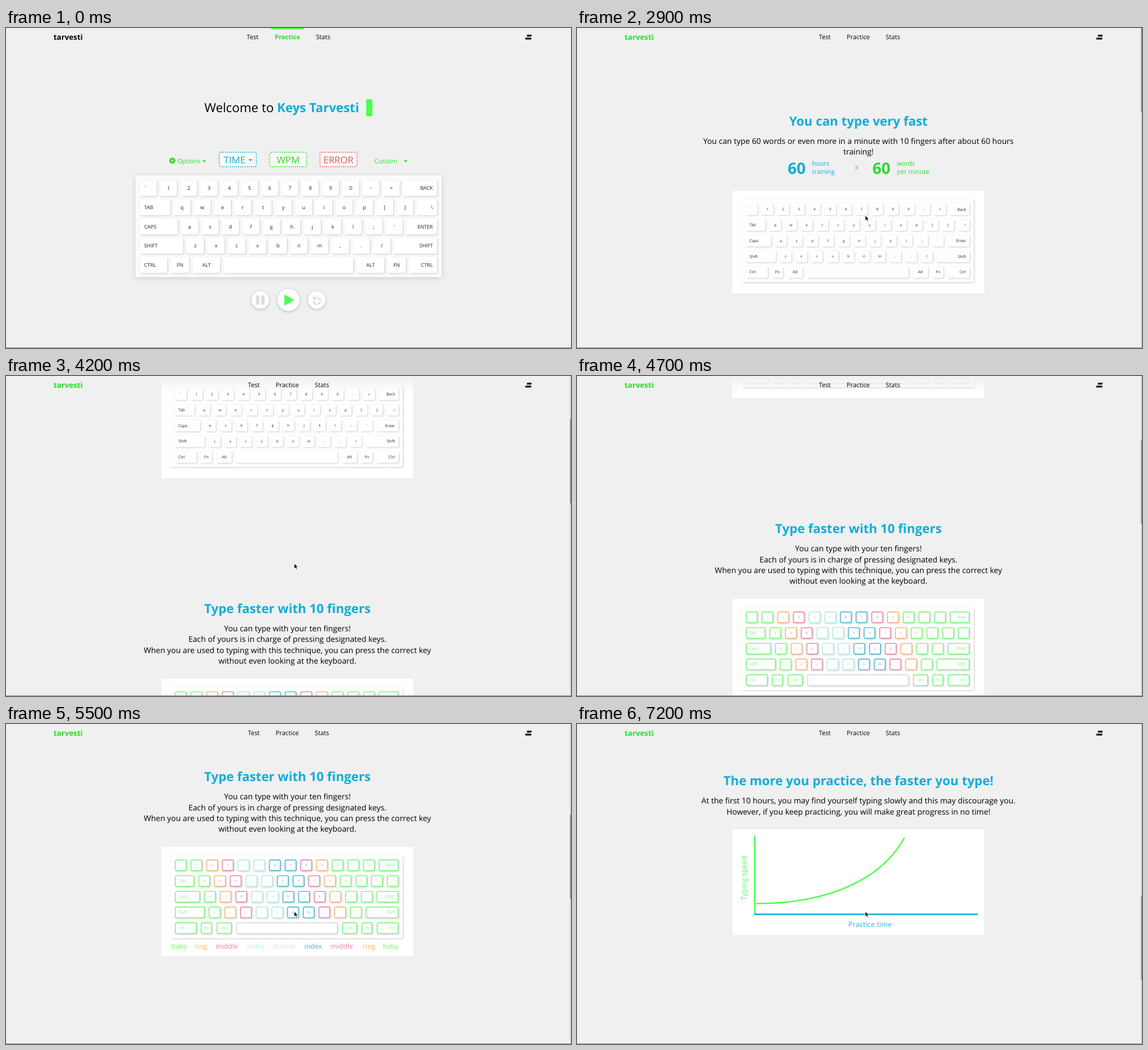
These frames come from a looping animation (960 by 544 pixels, 8 s). An HTML page:

```html
<!DOCTYPE html>
<html lang="en">
<head>
<meta charset="utf-8">
<title>Typing practice</title>
<style>
html, body { margin: 0; width: 100%; height: 100%; overflow: hidden; background: #f0f0f0; }
svg { display: block; width: 960px; height: 544px; font-family: "Open Sans", "Noto Sans", sans-serif; text-rendering: geometricPrecision; }
.panel { filter: drop-shadow(0 2px 4px #0002); }
.keys { filter: drop-shadow(1px 1.5px 1.5px #0003); }
.round { filter: drop-shadow(0 1.5px 2px #0004); }
</style>
</head>
<body>
<svg id="stage" viewBox="0 0 960 544"></svg>
<script>
const GREEN = "#2bdb2b", LIME = "#4dff4d", BLUE = "#0fadd8", RED = "#e25c5c";
const FINGER = { g: "#72fb72", o: "#f5b470", p: "#e680a4", c: "#b4eee9", b: "#3fb5d8", t: "#dedede" };
const TITLE = 21.42, BODY = 13.39, SMALL = 10.7;

const text = (x, y, str, size, fill = "#000", anchor = "start", more = "") =>
  `<text x="${x}" y="${y}" font-size="${size}" fill="${fill}" text-anchor="${anchor}" ${more}>${str}</text>`;
const bold = (x, y, str, size, fill, anchor) => text(x, y, str, size, fill, anchor, 'font-weight="700"');
const rect = (x, y, w, h, fill, more = "") =>
  `<rect x="${x}" y="${y}" width="${w}" height="${h}" fill="${fill}" ${more}/>`;
const path = (d, fill, more = "") => `<path d="${d}" fill="${fill}" ${more}/>`;
const caret = (x, y) => `M${x} ${y}h6.6l-3.3 3.6z`;

const ROWS = [
  ["`", "1234567890-=", "Back"],
  ["Tab", "qwertyuiop[]", "\\"],
  ["Caps", "asdfghjkl;'", "Enter"],
  ["Shift", "zxcvbnm,./", "Shift"]
];
const BOTTOM = ["Ctrl", "Fn", "Alt", "", "Alt", "Fn", "Ctrl"];

// Each row: a wide first key, equal letter keys from starts[i], a last key up to the right edge
const HOME_KEYS = {
  x0: 227.5, x1: 732.5, y: 258.5, dy: 32.75, h: 27, gap: 5.8, size: 8.67, letter: 8.67, pad: 7.3, caps: true,
  starts: [[261.9, 34.4], [284.7, 34.45], [297.5, 34.75], [307, 35.2]],
  bottom: [227.5, 274, 280, 311.5, 317.5, 364, 370, 590, 596, 642.5, 648, 679.5, 685, 732.5]
};
const CARD_KEYS = {
  x0: 287, x1: 667, y: 298.5, dy: 26.7, h: 19.5, gap: 6.7, size: 6.7, letter: 6, pad: 6, caps: false,
  starts: [[313.65, 26.65], [326.8, 26.7], [336.5, 26.65], [344.5, 26.65]],
  bottom: [287, 324, 331, 350, 358, 383.5, 391, 563.5, 571, 596.5, 604, 622.5, 630, 667]
};

function keyboard(k, colored) {
  let boxes = "", labels = "";
  const inset = colored ? .7 : 0;
  const key = (a, b, row, label, side, finger) => {
    const y = k.y + row * k.dy, color = FINGER[finger];
    boxes += rect(a + inset, y + inset, b - a - 2 * inset, k.h - 2 * inset, "#fff",
      `rx="2" ` + (colored ? `stroke="${color}" stroke-width="1.4"` : ""));
    const x = side == "start" ? a + k.pad : side == "end" ? b - k.pad : (a + b) / 2;
    const size = label.length > 1 ? k.size : k.letter;
    labels += text(x, y + k.h / 2 + size * .35 - inset, k.caps && label.length > 1 ? label.toUpperCase() : label,
      size, colored ? color : "#222", side);
  };
  ROWS.forEach(([first, mid, last], row) => {
    const [start, pitch] = k.starts[row];
    key(k.x0, start - k.gap, row, first, "start", "g");
    [...mid].forEach((c, i) => {
      const x = start + i * pitch;
      key(x, x + pitch - k.gap, row, c, "middle", "gopccbbpo"[i] || "g");
    });
    key(start + mid.length * pitch, k.x1, row, last, "end", "g");
  });
  BOTTOM.forEach((label, i) => key(k.bottom[2 * i], k.bottom[2 * i + 1], 4, label,
    i == 0 ? "start" : i == 6 ? "end" : "middle", label ? "g" : "t"));
  return `<g class="keys">${boxes}</g>${labels}`;
}

const dotted = (x, label, lx, color) =>
  rect(x, 211.3, 63, 24.4, "#f9f9f9", `rx="2.5" stroke="${color}" stroke-width="1.5" stroke-dasharray="1.8 1.8"`) +
  text(lx, 229.6, label, 16, color);

function gear(x, y) {
  let teeth = "";
  for (let i = 0; i < 8; i++) teeth += rect(x - 1.2, y - 5.5, 2.4, 3, GREEN, `transform="rotate(${i * 45} ${x} ${y})"`);
  return teeth + `<circle cx="${x}" cy="${y}" r="2.9" fill="none" stroke="${GREEN}" stroke-width="2.4"/>`;
}
const disc = (x, r) => `<circle class="round" cx="${x}" cy="462.5" r="${r}" fill="#fff"/>`;

const home = text(337, 143.3, "Welcome to", TITLE) +
  bold(460.5, 143.3, "Keys Tarvesti", TITLE, BLUE) +
  rect(612, 121, 10.5, 29, LIME, 'id="bar" rx="1.5"') +
  gear(282.6, 225.5) + text(291, 229.7, "Options", SMALL, GREEN) + text(626, 229.7, "Custom", SMALL, GREEN) +
  path(caret(333.7, 225) + caret(675.8, 225), GREEN) +
  dotted(362.3, "TIME", 370, BLUE) + path(caret(412, 223), BLUE) +
  dotted(448, "WPM", 460, GREEN) + dotted(533.5, "ERROR", 539.3, RED) +
  rect(220, 250.5, 520, 173, "#fbfbfb", 'rx="3" class="panel"') + keyboard(HOME_KEYS) +
  disc(432, 15) + rect(424.8, 454.5, 5.6, 16, "#ddd") + rect(433.8, 454.5, 5.6, 16, "#ddd") +
  disc(480, 19) + path("M473 453V472L490 462.5z", LIME) +
  disc(528, 15) + path("M524.5 459.5a5.8 5.8 0 1 1 -2 4.8", "none", 'stroke="#d6d6d6" stroke-width="1.8"') +
  path("M521.8 455.5v6h6z", "#d6d6d6");

const heading = (y, str) => bold(478.2, y, str, TITLE, BLUE, "middle");
const lines = (y, list) => list.map((s, i) => text(478.2, y + i * 18.4, s, BODY, "#000", "middle")).join("");
const card = (y, h) => rect(264, y, 428, h, "#fff");
const cardBoard = (y, colored) => `<g transform="translate(0 ${y - 277})">` +
  rect(280.5, 292, 393.5, 140, "#fff", 'rx="2" class="keys"') + keyboard(CARD_KEYS, colored) + "</g>";
const stat = (x, color, a, b) => bold(x, 247.7, "60", 26.67, color) +
  text(x + 41.5, 233.8, a, SMALL, color) + text(x + 41.5, 248, b, SMALL, color);
const fingers = [[294.5, "baby", "g"], [331.5, "ring", "o"], [375, "middle", "p"], [424.5, "index", "c"],
  [472.5, "thumb", "t"], [522, "index", "b"], [570.5, "middle", "p"], [617, "ring", "o"], [653.5, "baby", "g"]];

const about = heading(165.5, "You can type very fast") +
  lines(196.7, ["You can type 60 words or even more in a minute with 10 fingers after about 60 hours", "training!"]) +
  stat(358, BLUE, "hours", "training") + path("M473 232v11l6 -5.5z", "#ccc") + stat(502, GREEN, "words", "per minute") +
  card(277, 174) + cardBoard(277, false) +
  heading(680.3, "Type faster with 10 fingers") +
  lines(711.2, ["You can type with your ten fingers!", "Each of yours is in charge of pressing designated keys.",
    "When you are used to typing with this technique, you can press the correct key",
    "without even looking at the keyboard."]) +
  card(792, 186) + cardBoard(792, true) +
  fingers.map(([x, s, f]) => text(x, 964.5, s, 11.8, FINGER[f], "middle")).join("") +
  `<g transform="translate(0 1104)">` + heading(104, "The more you practice, the faster you type!") +
  lines(135.3, ["At the first 10 hours, you may find yourself typing slowly and this may discourage you.",
    "However, if you keep practicing, you will make great progress in no time!"]) +
  card(179, 179.5) +
  path("M302 190V323", "none", `stroke="${LIME}" stroke-width="2.5"`) +
  path("M301 323.5H681", "none", `stroke="${BLUE}" stroke-width="2.5"`) +
  path("M305 305.3C430 305 518 263 556.5 193", "none", `stroke="${LIME}" stroke-width="2.5"`) +
  text(498, 344.5, "Practice time", 12.25, "#2fb1d6", "middle") +
  text(0, 0, "Typing speed", 12.25, LIME, "middle", 'transform="translate(288 262) rotate(-90)"') + "</g>";

const INK = 'stroke-width=".9" stroke-linejoin="round"';
document.getElementById("stage").innerHTML =
  `<defs><linearGradient id="fade" x2="0" y2="1"><stop stop-color="#f0f0f0"/>
  <stop offset="1" stop-color="#f0f0f0" stop-opacity="0"/></linearGradient></defs>
  <g id="home">${home}</g><g id="about">${about}</g>` +
  rect(0, 0, 960, 28, "url(#fade)") +
  bold(80.7, 20, "tarvesti", 12.8, "#000").replace("<text", '<text id="logo"') +
  `<g id="navHome">` + rect(449.5, -2, 57, 4, LIME, 'rx="1.5"') + text(409, 19.4, "Test", SMALL) +
  bold(456.7, 19.4, "Practice", SMALL, GREEN) + text(526.7, 19.4, "Stats", SMALL) + "</g>" +
  `<g id="navAbout">` + text(411, 19.4, "Test", SMALL) + text(458.3, 19.4, "Practice", SMALL) +
  text(524.6, 19.4, "Stats", SMALL) + rect(958.3, 0, 1.7, 544, "#d2d2d2") +
  rect(958.3, 0, 1.7, 143, "#8c8c8c", 'id="thumb"') + "</g>" +
  path("M885.5 11.4h7.7l-.6 3h-7.7zM882.6 16.4h10l-.3 3h-10z", "#000") +
  rect(0, 543, 960, 1, "#8a8a8a") +
  `<g id="status">` + path("M0 533H316q2.5 0 2.5 2.5V544H0z", "#2c3038") +
  text(1.5, 542.6, "localhost:8080/about", 9, "#d8d8d8") + "</g>" +
  `<g id="mouse">` +
  path("M0 0V9.3L2.2 7.3L3.7 10.6L5.2 9.9L3.8 6.8H6.6z", "#000", `id="arrow" stroke="#fff" ${INK}`) +
  path("M0 .8Q1.2-.2 2 1V4.5L5.7 5.3Q6.6 5.7 6.4 7L5.5 11.5H.2L-2.7 7Q-2 5.8 0 7z", "#fff", `id="hand" stroke="#111" ${INK}`) +
  path("M-1.5 -4Q0-4 0-3V6Q0 7 1.5 7M1.5-4Q0-4 0-3M0 6Q0 7-1.5 7", "none", 'id="beam" stroke="#333" stroke-width=".8"') +
  "</g>";

const $ = id => document.getElementById(id);
const show = (id, on) => $(id).style.display = on ? "" : "none";
const clamp = v => Math.max(0, Math.min(1, v));
const ease = v => v * v * (3 - 2 * v);

const SCROLL = [[3100, 0], [3300, 15], [3500, 52], [3800, 121.5], [4000, 196], [4300, 318], [4500, 380], [4700, 413],
  [4900, 430], [5000, 440], [5500, 583], [5700, 692], [5800, 680], [6100, 624], [6600, 615.3], [6700, 930],
  [6800, 1017], [6900, 1064], [7000, 1089], [7100, 1100], [7200, 1104]];
function scrollAt(t) {
  let [pt, ps] = SCROLL[0];
  if (t <= pt) return ps;
  for (const [kt, ks] of SCROLL) {
    if (t <= kt) return ps + (ks - ps) * (t - pt) / (kt - pt);
    [pt, ps] = [kt, ks];
  }
  return ps;
}
// Page heights of the text the pointer passes over
const TEXTS = [[661, 687], [698, 772], [1189, 1214], [1226, 1262]];

function draw(t) {
  const s = scrollAt(t), mix = clamp((t - 1400) / 400), onAbout = t >= 1500;
  $("home").setAttribute("opacity", 1 - mix);
  $("about").setAttribute("opacity", mix);
  show("home", mix < 1);
  show("about", mix > 0);
  $("about").setAttribute("transform", `translate(0 ${-s})`);
  show("bar", (t + 900) % 1000 >= 500);
  show("navHome", !onAbout);
  show("navAbout", onAbout);
  $("logo").setAttribute("fill", onAbout ? GREEN : "#000");
  $("thumb").setAttribute("y", s * .264);
  show("status", t >= 1400 && t < 2500);

  const come = ease(clamp((t - 500) / 900)), go = ease(clamp((t - 2100) / 800));
  const x = 430 - 304 * come + 363.7 * go, y = 548 - 527.5 * come + 298 * go;
  show("mouse", t >= 600);
  $("mouse").setAttribute("transform", `translate(${x} ${y})`);
  const hand = t >= 1400 && y < 32;
  const beam = t >= 3000 && TEXTS.some(([a, b]) => s + 320 >= a && s + 320 <= b);
  show("hand", hand);
  show("beam", beam);
  show("arrow", !hand && !beam);
}

let start;
function tick(now) {
  start ??= now;
  draw(Math.floor((now - start) % 8000 / 100) * 100);
  requestAnimationFrame(tick);
}
draw(0);
requestAnimationFrame(tick);
</script>
</body>
</html>
```
